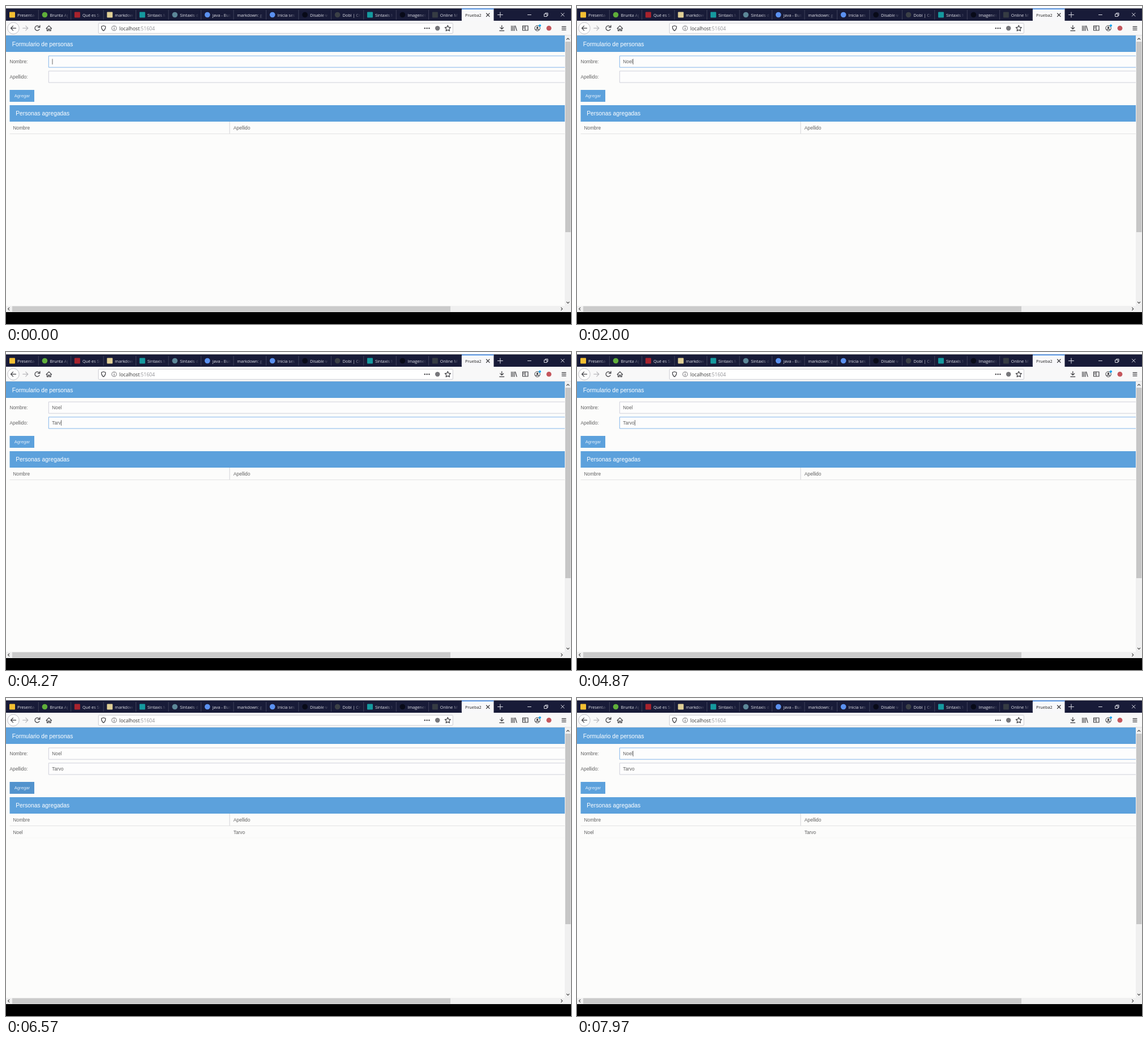
Recreate the animation shown at these times as an HTML page. Size 998x561 px, loop 8 s.

```html
<!DOCTYPE html>
<html lang="es">
<head>
<meta charset="utf-8">
<title>Formulario de personas</title>
<style>
  html, body { margin: 0; width: 100%; height: 100%; overflow: hidden; background: #000; }
  #stage { display: block; width: 998px; height: 561px; }
  text { font-family: "Liberation Sans", Arial, sans-serif; font-size: 8.3px; fill: #606060; white-space: pre; }
  .ui { font-family: "Open Sans", sans-serif; font-size: 7.3px; fill: #e4e5ec; }
  .url { font-size: 8.6px; fill: #333; }
  .title { font-size: 10.2px; fill: #fff; }
  .icon { fill: none; stroke: #3c3c40; stroke-width: 1.2; stroke-linecap: round; stroke-linejoin: round; }
</style>
</head>
<body>
<svg id="stage" viewBox="0 0 998 561"></svg>
<script>
const stage = document.getElementById('stage');
const BLUE = '#5ca1dc', DARK_BLUE = '#5293cd', PAGE = '#fcfcfb', NAVY = '#181b38';
const FIRST = 'Noel', LAST = 'Tarvo';

function add(tag, attrs, parent = stage) {
  const el = document.createElementNS('http://www.w3.org/2000/svg', tag);
  for (const key in attrs) el.setAttribute(key, attrs[key]);
  return parent.appendChild(el);
}
const rect = (x, y, width, height, fill, more = {}) => add('rect', { x, y, width, height, fill, ...more });
const circle = (cx, cy, r, fill, more = {}) => add('circle', { cx, cy, r, fill, ...more });
const icon = (d, more = {}) => add('path', { d, class: 'icon', ...more });
function label(x, y, content, more = {}, parent = stage) {
  const el = add('text', { x, y, ...more }, parent);
  el.textContent = content;
  return el;
}

// Tab strip
const TAB = 57.45;
const tabs = [
  ['Presentac', 'square', '#f4bf32'], ['Brunta Ap', 'circle', '#5fae3a'],
  ['Qué es Su', 'square', '#a8232d'], ['markdown', 'square', '#e0cf96'],
  ['Sintaxis M', 'square', '#159a9f'], ['Sintaxis d', 'circle', '#5c8798'],
  ['java - Bus', 'circle', '#5b91f0'], ['markdown: g'],
  ['Inicia ses', 'circle', '#5b91f0'], ['Disable w', 'circle', '#080a18'],
  ['Dobi | Cr', 'circle', '#3b4046'], ['Sintaxis M', 'square', '#159a9f'],
  ['Imagenes', 'circle', '#080a18'], ['Online Ma', 'square', '#353b43']
];

function drawTabs() {
  rect(0, 0, 998, 4.5, '#fdfdfd');
  rect(0, 4.5, 998, 21.5, NAVY);
  const fade = add('linearGradient', { id: 'fade' }, add('defs', {}));
  add('stop', { offset: 0, 'stop-color': NAVY, 'stop-opacity': 0 }, fade);
  add('stop', { offset: 1, 'stop-color': NAVY }, fade);
  tabs.forEach(([name, shape, color], i) => {
    const left = i * TAB;
    const textX = shape ? 20 : 6;
    const box = add('svg', { x: left, y: 5, width: 51, height: 21 });
    label(textX, 13.6, name, { class: 'ui' }, box);
    add('rect', { x: 40, y: 0, width: 12, height: 21, fill: 'url(#fade)' }, box);
    if (shape === 'square') rect(left + 6, 10.5, 10, 10, color, { rx: 1 });
    if (shape === 'circle') circle(left + 11, 15.5, 4.8, color);
    rect(left + TAB - 0.6, 7, 0.8, 17, '#484a62');
  });
  rect(805, 4.5, 56.5, 21.5, '#f8f8fa');
  rect(805, 4.5, 56.5, 1.4, '#2f83ee');
  label(811, 18.6, 'Prueba2', { class: 'ui', style: 'fill:#222' });
  icon('M848.5 13l5.5 5.5m0-5.5l-5.5 5.5');
  icon('M868.5 15.5h9m-4.5-4.5v9M921.5 15.5h6M980.5 12.5l5.5 5.5m0-5.5l-5.5 5.5' +
       'M951 14h4.5v4.5h-4.5zM952.6 13.8v-1.4h4.5v4.5h-1.4', { style: 'stroke:#dcdde6;stroke-width:1' });
}

// Navigation bar
function drawToolbar() {
  rect(0, 26, 998, 26, '#f8f8f8');
  rect(0, 51.3, 998, 0.7, '#d4d4d8');
  circle(13, 39.2, 10.2, '#fff', { stroke: '#bcbcc2', 'stroke-width': 0.9 });
  icon('M17.5 39.2h-9m4-4l-4 4l4 4');
  icon('M29.8 39.2h9m-4-4l4 4l-4 4', { style: 'stroke:#b5b5b9' });
  icon('M59 41a4.2 4.2 0 1 1-.6-4.7l1.2 1.2m.3-3.3v3.5h-3.5');
  icon('M71 39.6l4.8-4.7l4.8 4.7M72.5 39v4.7h2.2v-3h2.2v3h2.2V39');
  rect(163.3, 30.3, 626, 18, '#fff', { stroke: '#c8c8cd', 'stroke-width': 0.9, rx: 1 });
  icon('M168.6 36l3.6-1.2l3.6 1.2c0 4-1 6.3-3.6 7.6c-2.6-1.3-3.6-3.6-3.6-7.6z', { 'stroke-width': 1 });
  circle(191, 39.2, 4.1, 'none', { stroke: '#66666a', 'stroke-width': 0.9 });
  icon('M191 38.8v2.4m0-4.4v.1', { style: 'stroke:#66666a' });
  const address = label(200, 42.5, 'localhost', { class: 'ui url' });
  const port = add('tspan', { fill: '#929296' }, address);
  port.textContent = ':51604';
  for (const x of [739.8, 743.6, 747.4]) circle(x, 39.2, 1.2, '#48484c');
  circle(762.2, 39.2, 4.2, '#77777b');
  icon('M780.3 34.2l1.5 3.2l3.5.5l-2.5 2.5l.6 3.5l-3.1-1.7l-3.1 1.7l.6-3.5l-2.5-2.5l3.5-.5z', { 'stroke-width': 1 });
  icon('M875.8 34.3v6.5m-3-3l3 3l3-3m-7 5.8h8');
  icon('M892.8 35v8.4m2.6-8.4v8.4m2.6-8.4v8.4m1.7-8.2l2.4 8.2');
  icon('M912.6 35h9.4v8h-9.4zM917 35v8m-2.8-6h1m-1 2h1');
  circle(938.6, 39.2, 4.7, 'none', { stroke: '#3c3c40' });
  circle(938.6, 38, 1.7, '#3c3c40');
  icon('M935.8 42q2.8-2.6 5.6 0');
  circle(943, 34.6, 2.1, '#18a5f1');
  circle(959, 39.2, 4.4, '#c4565c');
  icon('M982 36.3h7m-7 2.9h7m-7 2.9h7');
}

// Page content
function drawPage() {
  rect(0, 52, 988, 477, PAGE);
  rect(0, 52, 987, 29, BLUE);
  label(10.8, 70.6, 'Formulario de personas', { class: 'title' });
  label(6.5, 101, 'Nombre:');
  label(6.5, 128.2, 'Apellido:');
  rect(6.5, 175, 980.5, 29, BLUE);
  label(17.2, 193.4, 'Personas agregadas', { class: 'title', style: 'font-size:10.3px' });
  label(12.6, 218.3, 'Nombre');
  label(401.8, 218.3, 'Apellido');
  rect(394.5, 204, 1, 21.5, '#d2d2d8');
  rect(6.5, 225, 980.5, 0.8, '#dedede');
}

function drawScrollbars() {
  rect(987, 52, 11, 488, '#f0f0f0');
  rect(0, 529, 988, 11, '#f0f0f0');
  rect(988, 63, 9.4, 336, '#c6c6c6');
  rect(11, 529.6, 774, 9.8, '#cbcbcb');
  icon('M990.4 59l2.2-2.2l2.2 2.2M990.4 522.2l2.2 2.2l2.2-2.2' +
       'M5.8 532.2l-2.2 2.2l2.2 2.2M980.6 532.2l2.2 2.2l-2.2 2.2', { style: 'stroke:#444;stroke-width:1.1' });
  rect(0, 540, 998, 21, '#000');
}

function makeField(top) {
  const frame = add('path', { d: `M987 ${top}H75.3V${top + 20.2}H987`, fill: '#fdfdfd', 'stroke-width': 1 });
  const text = label(81.3, top + 13.2, '');
  const caret = rect(0, top + 5.3, 0.8, 9.8, '#444');
  return (value, focusedAt, lastKey, t) => {
    const focused = focusedAt !== null;
    text.textContent = value;
    frame.setAttribute('stroke', focused ? '#84b6ea' : '#cfd0da');
    const on = focused && Math.floor((t - Math.max(focusedAt, lastKey)) / 530) % 2 === 0;
    caret.setAttribute('visibility', on ? 'visible' : 'hidden');
    caret.setAttribute('x', 81.6 + (value ? text.getComputedTextLength() : 0));
  };
}

drawTabs();
drawToolbar();
drawPage();
const showFirst = makeField(88);
const showLast = makeField(114.8);
const button = rect(6.5, 148, 43.5, 21, BLUE);
label(14.7, 161.3, 'Agregar', { style: 'font-size:7.7px;fill:#e4effa' });
const row = add('g', {});
label(12.6, 240.1, FIRST, {}, row);
label(401.8, 240.1, LAST, {}, row);
add('rect', { x: 6.5, y: 246.6, width: 980.5, height: 0.7, fill: '#f3f3f1' }, row);
drawScrollbars();

// Times in ms
const LOOP = 8000;
const firstKeys = [1000, 1200, 1400, 1600];
const lastKeys = [2680, 3400, 3700, 4000, 4420];
const toLast = 2200, toButton = 4900, added = 5250, toFirst = 6900;

function typed(word, keys, t) {
  const done = keys.filter(k => k <= t);
  return [word.slice(0, done.length), done.length ? done[done.length - 1] : 0];
}

function render(t) {
  const [first, firstKey] = typed(FIRST, firstKeys, t);
  const [last, lastKey] = typed(LAST, lastKeys, t);
  const firstFocus = t < toLast ? 0 : t >= toFirst ? toFirst : null;
  const lastFocus = t >= toLast && t < toButton ? toLast : null;
  showFirst(first, firstFocus, firstKey, t);
  showLast(last, lastFocus, lastKey, t);
  button.setAttribute('fill', t >= toButton && t < toFirst ? DARK_BLUE : BLUE);
  row.setAttribute('visibility', t >= added ? 'visible' : 'hidden');
}

const start = performance.now();
function tick() {
  render((performance.now() - start) % LOOP);
  requestAnimationFrame(tick);
}
tick();
</script>
</body>
</html>
```
